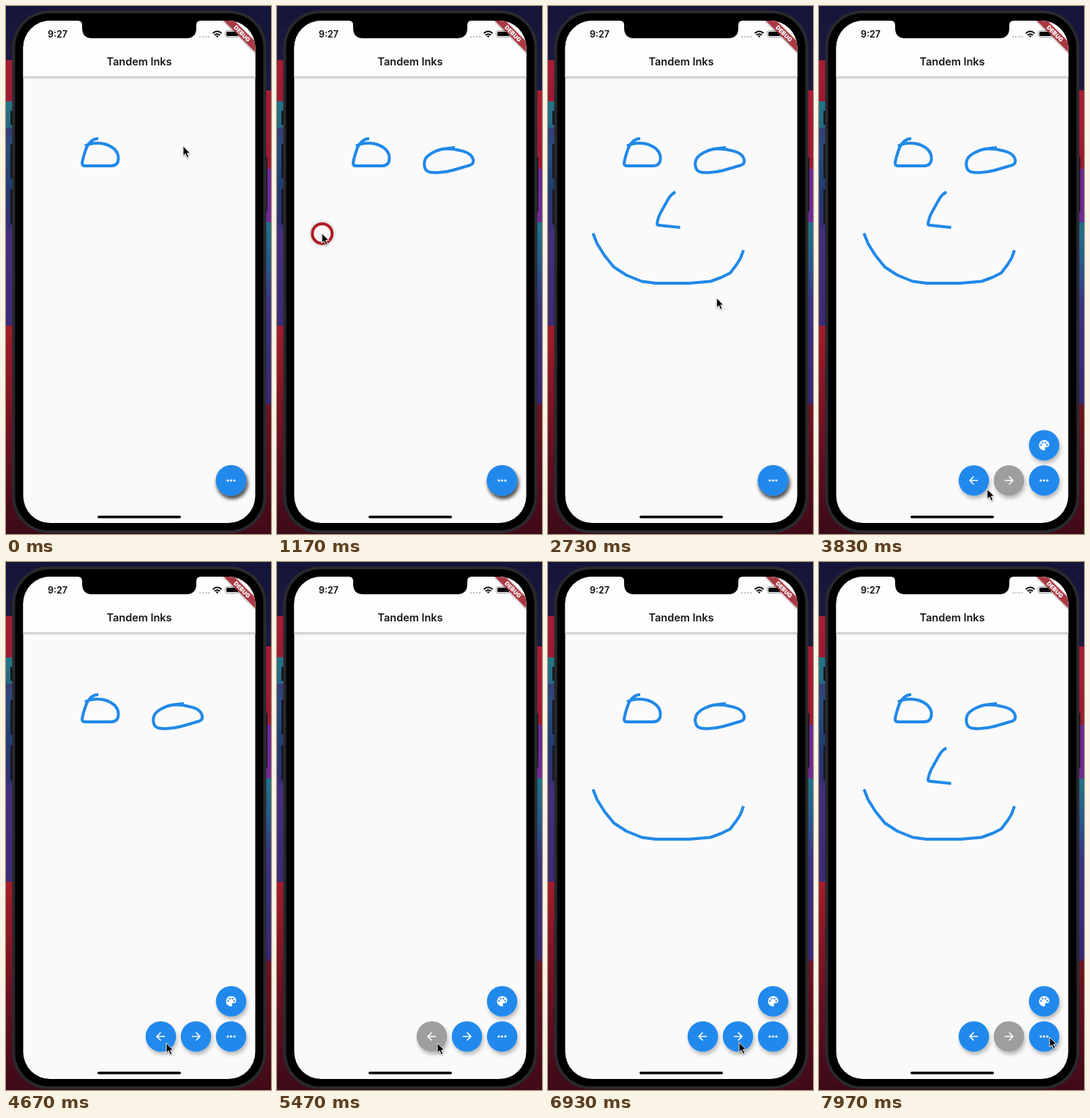
An HTML page for the animation above (8000 ms loop, 362 by 720 pixels).

```html
<!DOCTYPE html>
<html lang="en">
<head>
<meta charset="utf-8">
<title>Drawing app</title>
<style>
  html, body { margin: 0; width: 100%; height: 100%; overflow: hidden; background: #15163a; }
  svg { display: block; width: 100%; height: 100%; }
  text { font-family: Inter, Roboto, sans-serif; }
  .ink path { fill: none; stroke: #2189e8; stroke-width: 4; stroke-linejoin: round; }
  .icon { fill: none; stroke: #fff; stroke-width: 1.6; }
</style>
</head>
<body>
<svg viewBox="0 0 362 720">
  <defs>
    <linearGradient id="wallL" x2="0" y2="1">
      <stop offset="0" stop-color="#141538"/><stop offset=".103" stop-color="#1d1a40"/>
      <stop offset=".103" stop-color="#a81c34"/><stop offset=".18" stop-color="#9c1a34"/>
      <stop offset=".18" stop-color="#217784"/><stop offset=".23" stop-color="#256884"/>
      <stop offset=".23" stop-color="#343d74"/><stop offset=".27" stop-color="#294d80"/>
      <stop offset=".35" stop-color="#203c70"/><stop offset=".41" stop-color="#303074"/>
      <stop offset=".43" stop-color="#44307c"/><stop offset=".606" stop-color="#3b2a74"/>
      <stop offset=".606" stop-color="#a41c2c"/><stop offset=".75" stop-color="#7c1424"/>
      <stop offset="1" stop-color="#3c0a18"/>
    </linearGradient>
    <linearGradient id="wallR" x2="0" y2="1">
      <stop offset="0" stop-color="#141538"/><stop offset=".16" stop-color="#1c1a40"/>
      <stop offset=".16" stop-color="#ac1c34"/><stop offset=".308" stop-color="#9a1a34"/>
      <stop offset=".308" stop-color="#6b2a98"/><stop offset=".41" stop-color="#702a94"/>
      <stop offset=".41" stop-color="#1f7488"/><stop offset=".49" stop-color="#28588c"/>
      <stop offset=".56" stop-color="#383484"/><stop offset=".75" stop-color="#372774"/>
      <stop offset=".76" stop-color="#701220"/><stop offset="1" stop-color="#400a18"/>
    </linearGradient>
    <linearGradient id="barShade" x2="0" y2="1">
      <stop offset="0" stop-color="#bcbcbe"/><stop offset="1" stop-color="#bcbcbe" stop-opacity="0"/>
    </linearGradient>
    <radialGradient id="glow">
      <stop offset=".6" stop-color="#606068" stop-opacity=".3"/><stop offset="1" stop-color="#606068" stop-opacity="0"/>
    </radialGradient>
    <filter id="shade" x="-50%" y="-50%" width="200%" height="200%">
      <feDropShadow dx="1.6" dy="4" stdDeviation="2.6" flood-color="#000" flood-opacity=".26"/>
    </filter>
    <filter id="soft" x="-50%" y="-50%" width="200%" height="200%">
      <feDropShadow dx="0" dy="1" stdDeviation="1" flood-color="#000" flood-opacity=".4"/>
    </filter>
    <clipPath id="screen"><rect x="23.5" y="20" width="317" height="685" rx="37"/></clipPath>
  </defs>

  <rect width="181" height="720" fill="url(#wallL)"/>
  <rect x="181" width="181" height="720" fill="url(#wallR)"/>
  <path d="M6 143h4v19h-4zM6 188h4v47h-4zM6 250h4v48h-4zM354 206h3v74h-3z" fill="#17171c"/>
  <rect x="8.5" y="6" width="347" height="713" rx="50" fill="#29292e"/>
  <rect x="12.5" y="10" width="339" height="705" rx="46"/>

  <g clip-path="url(#screen)">
    <rect x="23" y="20" width="318" height="685" fill="#fafafa"/>
    <rect x="23" y="20" width="318" height="77" fill="#fefefe"/>
    <rect x="23" y="96" width="318" height="4" fill="url(#barShade)"/>
    <text x="182" y="81" font-size="14.5" font-weight="600" text-anchor="middle" fill="#161618">Tandem Inks</text>
    <text x="57" y="43" font-size="12.5" font-weight="600" fill="#0c0c0e">9:27</text>
    <g fill="#c6c6c8"><circle cx="265" cy="42" r="1.3"/><circle cx="269" cy="42" r="1.3"/><circle cx="273" cy="42" r="1.3"/><circle cx="277" cy="42" r="1.3"/></g>
    <g fill="none" stroke="#08080a" stroke-width="2">
      <path d="M282.6 37.2Q288.5 31.8 294.4 37.2M284.8 39.8Q288.5 36.6 292.2 39.8"/>
      <path d="M286.6 41L288.5 43L290.4 41Q288.5 39.4 286.6 41Z" fill="#08080a" stroke="none"/>
    </g>
    <rect x="299.5" y="33.5" width="19" height="9" rx="2.6" fill="none" stroke="#a0a0a2"/>
    <rect x="301" y="35" width="16" height="6" rx="1.5" fill="#08080a"/>
    <g transform="translate(340 20) rotate(45)">
      <rect x="-40" y="19.8" width="80" height="10.2" fill="#a8303a" fill-opacity=".93" filter="url(#soft)"/>
      <text y="27.8" font-size="8" font-weight="900" text-anchor="middle" fill="#fff">DEBUG</text>
    </g>
    <g class="ink" id="ink"></g>
    <g id="fabs"></g>
    <rect x="125" y="695" width="114" height="3.6" rx="1.8"/>
  </g>
  <path d="M98 19V20Q104 20 104 26V30Q104 44 118 44H246Q260 44 260 30V26Q260 20 266 20V19Z"/>

  <g id="ring">
    <circle r="20" fill="url(#glow)"/>
    <circle r="13.5" fill="#f6f6f6" stroke="#b01c24" stroke-width="4"/>
  </g>
  <path id="arrow" d="M0 0V13.4L3.1 10.5 5.4 15.8 7.8 14.8 5.5 9.7H9.6Z" stroke="#fff" stroke-width=".9" filter="url(#soft)"/>
</svg>

<script>
const LOOP = 8000, NS = 'http://www.w3.org/2000/svg';
const $ = id => document.getElementById(id);
const clamp = v => Math.max(0, Math.min(1, v));
const ease = {
  both: p => p * p * (3 - 2 * p),
  in: p => p * p,
  out: p => p * (2 - p)
};

function add(parent, tag, attrs, html = '') {
  const el = document.createElementNS(NS, tag);
  for (const k in attrs) el.setAttribute(k, attrs[k]);
  el.innerHTML = html;
  return parent.appendChild(el);
}

// Strokes in the order they are drawn; start and end are pen times.
const strokes = [
  { d: 'M126 181C119 180 113 187 110 193C107 201 105 208 104 214Q104 218 108 218H143Q151 218 153 212C155 204 152 199 148 195C141 189 133 187 125 187Q114 187 108 191', start: -2, end: -1 },
  { d: 'M243 193L226 195C217 197 207 202 203 208C200 214 201 219 203 223Q206 227 213 227Q226 228 240 224L264 217Q269 215 268 210C267 203 260 199 250 197C242 195 231 194 222 196', start: 70, end: 790 },
  { d: 'M61.5 310L67 324 77 340 90 356 107 367 128 375.5 147 378H193L222 375.5 237 370 249 364 258 352 263 344 267 333', start: 1190, end: 1820 },
  { d: 'M174 253.5Q168 257 165 262L156 278Q150 288 149 297Q149 299 152 299L180.5 302', start: 2080, end: 2400 }
];
for (const s of strokes) {
  s.el = add($('ink'), 'path', { d: s.d });
  s.len = s.el.getTotalLength();
}
// The pen speeds up a little in the middle of a stroke.
function progress(s, t) {
  const p = clamp((t - s.start) / (s.end - s.start));
  return (p + ease.both(p)) / 2;
}
const penAt = (s, p) => {
  const q = s.el.getPointAtLength(s.len * p);
  return [q.x, q.y];
};

const HOLD = 110, MENU = 3240;
const taps = (first, gap) => [0, 1, 2, 3].map(i => first + gap * i);
const undos = taps(4120, 340), redos = taps(6020, 370);
const presses = [
  [30, 810], [1120, 1840], [2050, 2420],
  ...[MENU, ...undos, ...redos].map(t => [t, t + HOLD])
];

// Pointer moves between strokes: time, x, y, easing of the way there.
const moves = [
  [0, 242, 191], [70, 243, 193], [790, ...penAt(strokes[1], 1)],
  [1130, 60.5, 309.5], [1190, 61.5, 310], [1820, ...penAt(strokes[2], 1)],
  [2060, 174, 253.5], [2400, ...penAt(strokes[3], 1)],
  [2730, 230, 397, 'in'], [3200, 307, 649, 'out'], [3470, 307, 649],
  [3830, 230, 659], [3960, 219, 656, 'out'], [5500, 219, 656],
  [5840, 261, 655], [7400, 261, 655], [7780, 315, 648], [LOOP, 315, 648]
];

function pointer(t) {
  const s = strokes.find(s => t >= s.start && t <= s.end);
  if (s) return penAt(s, progress(s, t));
  const i = moves.findIndex(m => m[0] > t);
  const [t0, x0, y0] = moves[i - 1], [t1, x1, y1, e = 'both'] = moves[i];
  const p = ease[e]((t - t0) / (t1 - t0));
  return [x0 + (x1 - x0) * p, y0 + (y1 - y0) * p];
}

const arrowIcon = '<path class="icon" d="M5.7 0H-5M0 -5.5L-5.5 0L0 5.5"/>';
const palette = `<path fill="#fff" d="M0 -7A7 7 0 0 0 0 7Q2 7 1.5 5Q0 2.5 2.5 2.5H4Q7 2.5 7 -1C7 -4.5 4 -7 0 -7Z"/>
  <g fill="#2189ec"><circle cx="-4.2" cy="-.5" r="1.2"/><circle cx="-2" cy="-3.6" r="1.2"/><circle cx="2" cy="-3.6" r="1.2"/><circle cx="4.3" cy="-.5" r="1.2"/></g>`;
const dots = '<g fill="#fff"><circle cx="-4.5" r="1.6"/><circle r="1.6"/><circle cx="4.5" r="1.6"/></g>';
const fabs = [
  [0, -48, palette], [-96, 0, arrowIcon], [-48, 0, `<g transform="scale(-1 1)">${arrowIcon}</g>`], [0, 0, dots]
].map(([dx, dy, icon]) => {
  const el = add($('fabs'), 'g', { filter: 'url(#shade)' }, `<circle r="20.8"/>${icon}`);
  return { dx, dy, el, disc: el.firstChild };
});

function draw(t) {
  const done = list => list.filter(c => t >= c + HOLD).length;
  const gone = done(undos) - done(redos);
  strokes.forEach((s, i) => {
    const p = progress(s, t);
    s.el.style.display = p > 0 && i < 4 - gone ? '' : 'none';
    s.el.setAttribute('stroke-dasharray', p < 1 ? `${s.len * p} ${s.len + 9}` : 'none');
  });

  const open = ease.out(clamp((t - MENU - HOLD) / 250));
  const off = [false, gone === 4, gone === 0, false];
  fabs.forEach((f, i) => {
    f.el.setAttribute('transform', `translate(${307.5 + f.dx * open} ${647 + f.dy * open})`);
    f.disc.setAttribute('fill', off[i] ? '#9e9e9e' : '#2189ec');
  });

  const [x, y] = pointer(t);
  $('arrow').setAttribute('transform', `translate(${x} ${y})`);
  $('ring').setAttribute('transform', `translate(${x + .5} ${y + .5})`);
  $('ring').style.display = presses.some(([a, b]) => t >= a && t < b) ? '' : 'none';
}

const begin = performance.now();
function tick() {
  draw((performance.now() - begin) % LOOP);
  requestAnimationFrame(tick);
}
tick();
</script>
</body>
</html>
```
